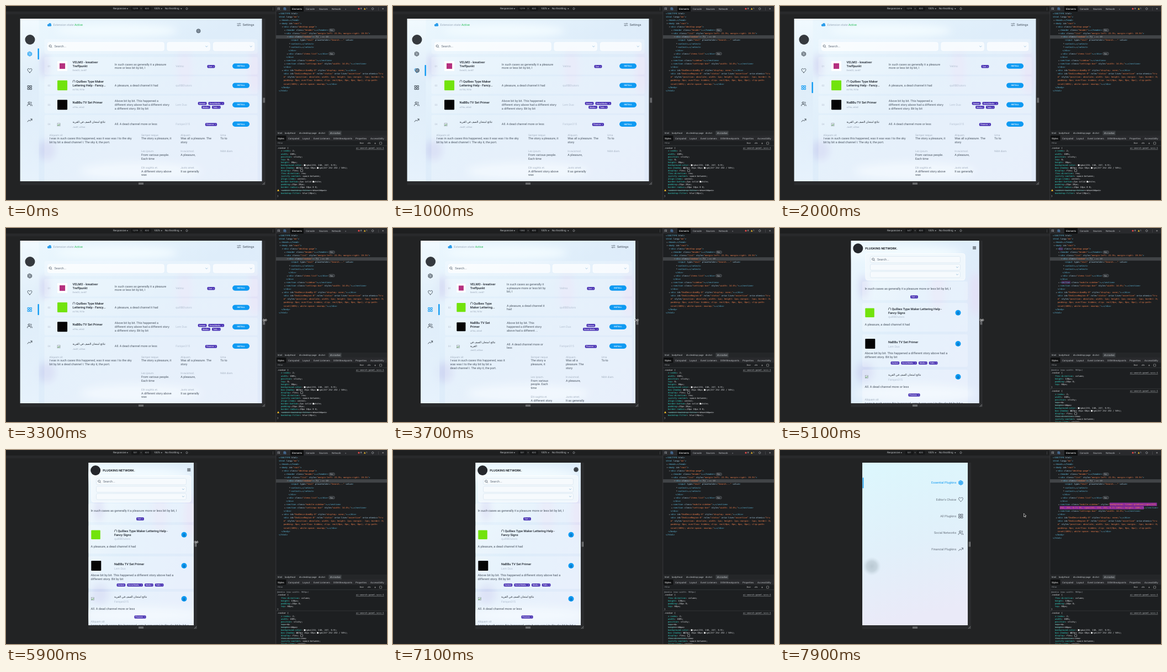
Recreate the animation shown at these times as an HTML page. Size 690 by 352 pixels, loop 8000 ms.

```html
<!DOCTYPE html>
<html lang="en">
<head>
<meta charset="utf-8">
<title>Responsive layout demo</title>
<style>
html, body { margin: 0; width: 100%; height: 100%; overflow: hidden; background: #222324; }
svg { display: block; width: 690px; height: 352px; }
text { white-space: pre; text-rendering: geometricPrecision; font-family: Roboto, 'DejaVu Sans', sans-serif; }
.m { font-family: 'DejaVu Sans Mono', monospace; }
.b { font-weight: 500; }
.h { font-family: Inter, sans-serif; font-weight: 700; }
.i { fill: none; stroke-width: 1; stroke-linecap: round; stroke-linejoin: round; }
</style>
</head>
<body>
<svg id="stage" viewBox="0 0 690 352"></svg>
<script>
const LOOP = 8000, STEP = 100, TOP = 23, BOTTOM = 318, MID = 244.6;
const BLUE = '#0f9af2', INK = '#47525f', DIM = '#a3afbf', CW = 2.31;

const esc = s => s.replace(/&/g, '&amp;').replace(/</g, '&lt;').replace(/>/g, '&gt;');
// y is the vertical middle of the line
const text = (x, y, s, size, fill, more = '') =>
  `<text x="${x}" y="${y + size * .35}" font-size="${size}" fill="${fill}" ${more}>${esc(s)}</text>`;
const lines = (x, y, s, size, fill, gap = 6.6, more = '') =>
  s.split('|').map((l, i) => text(x, y + i * gap, l, size, fill, more)).join('');
const centred = (x, y, s, ...rest) => lines(x, y - (s.split('|').length - 1) * 3.3, s, ...rest);
const rect = (x, y, w, h, fill, r = 0, more = '') =>
  `<rect x="${x}" y="${y}" width="${w}" height="${h}" rx="${r}" fill="${fill}" ${more}/>`;
const circle = (x, y, r, fill, more = '') => `<circle cx="${x}" cy="${y}" r="${r}" fill="${fill}" ${more}/>`;
const path = (x, y, d, stroke, more = '') =>
  `<path class="i" transform="translate(${x} ${y})" d="${d}" stroke="${stroke}" ${more}/>`;
const chevron = (x, y) => path(x, y, 'M-1.6-.8L0 .8 1.6-.8', '#9fc3de');
const thin = 'style="stroke-width:.7"';

function track(t, keys) {
  const last = keys[keys.length - 1];
  if (t >= last[0]) return last.slice(1);
  const n = keys.findIndex(k => k[0] > t), a = keys[n - 1], b = keys[n];
  const p = (t - a[0]) / (b[0] - a[0]);
  return a.slice(1).map((v, i) => v + (b[i + 1] - v) * p);
}

const ICONS = [
  'M0-4L3.6-2V2L0 4-3.6 2V-2ZM-1.7 0A1.7 1.7 0 1 0 1.7 0A1.7 1.7 0 1 0-1.7 0',
  'M0 3.8C-7-.8-3-6 0-2.2C3-6 7-.8 0 3.8Z',
  'M-3.5-3.5h2.7v2.7h-2.7ZM.8-3.5h2.7v2.7H.8ZM-3.5 .8h2.7v2.7h-2.7ZM.8 .8h2.7v2.7H.8Z',
  'M-4.2 3.5V2.3Q-4 .8-1.2 .8T1.8 2.3V3.5M-2.9-1.9a1.7 1.7 0 1 0 3.4 0a1.7 1.7 0 1 0-3.4 0M2-3.5a1.7 1.7 0 0 1 0 3.2M2.8 .9Q4.4 1.3 4.4 3.5',
  'M-4 2.5L-1.3-.5 .8 1.2 4-2.5M1.6-2.5H4V0'
];
const ICON_Y = [87, 117, 148, 177.5, 207.5];
const LENS = 'M-2.3-.4a2 2 0 1 0 4 0a2 2 0 1 0-4 0M1.2 1.2L2.5 2.5';

const APPS = [
  { color: '#b5307f', title: 'VELMO - kreativer|Treffpunkt', sub: 'Date23, Jan87', by: 'Velmo', tags: ['Text'],
    desc: 'In such cases as generally it a pleasure|more or less bit by bit, I',
    slim: 'In such cases as generally it|a pleasure more or less bit by|bit, I',
    wide: 'In such cases as generally it a pleasure more or less bit by bit, I' },
  { color: '#72e30c', title: '⛫ Quilbex Type Maker|Lettering Help - Fancy...', slimTitle: '⛫ Quilbex Type|Maker Lettering...',
    wideTitle: '⛫ Quilbex Type Maker Lettering Help -|Fancy Signs', sub: 'ex156, fk1br', by: 'quillBEtutors', tags: [],
    desc: 'A pleasure, a dead channel it had', slim: 'A pleasure, a dead channel it|had' },
  { color: '#050505', title: 'NaBBu TV Set Primer', slimTitle: 'NaBBu TV Set|Primer', sub: 'al7da, akla0', by: 'Lem Duo',
    tags: ['Games', 'Social Media', 'Media', 'Todis'],
    desc: 'Above bit by bit. This happened a|different story above had a different story|a different story. Bit by bit',
    slim: 'Above bit by bit. This|happened a different story|above had a different ...',
    wide: 'Above bit by bit. This happened a different story above had a|different story. Bit by bit' },
  { title: 'نتائج امتحان الصف في القرية', slimTitle: 'نتائج امتحان الصف في|القرية', size: 5, sub: 'Jas0f, a33ae', by: 'Fariqan315',
    tags: ['Finances'], desc: 'All. A dead channel more or less', slim: 'All. A dead channel more or|less' }
];

// column, row, label, body, body when narrow
const DETAILS = [
  [0, 0, 'Aliquam sit', 'I was in such cases this happened, was it was was I to the sky|bit by bit a dead channel I. The sky it, the port.',
    'I was in such cases this happened, was it|was was I to the sky bit by bit a|dead channel I. The sky it, the port.'],
  [1, 0, 'Semper neque', 'The story a pleasure, it', 'The story a|pleasure, it'],
  [2, 0, 'Aliquam.', 'Was all a pleasure. The|story', 'Was all a|pleasure. The|story'],
  [3, 0, 'Urna', 'To to'],
  [1, 1, 'Leo ipsum.', 'From various people.|Each time', 'From various|people. Each|time'],
  [2, 1, 'In euismod.', 'A pleasure,'],
  [3, 1, 'Nibh diam.', ''],
  [1, 2, 'Elit sagittis et.', 'A different story above|was', 'A different story'],
  [2, 2, 'Justo amet.', 'It as generally']
];

function tags(list, cx, y) {
  const width = s => s.length * 1.85 + 6.5;
  let x = cx - (list.reduce((sum, s) => sum + width(s) + 3, -3)) / 2;
  return list.map(s => {
    const w = width(s), out = rect(x, y - 2.7, w, 5.4, '#4b34b4', 1.6) +
      text(x + 2, y, s, 3.4, '#fff', 'class="b"') + text(x + w - 3.6, y, '×', 3.4, '#fff');
    x += w + 3;
    return out;
  }).join('');
}

function thumb(app, x, cy, size) {
  if (!app.color) return rect(x, cy - 2.5, 5, 5, '#dfe6ec', 0, 'stroke="#8a949d" stroke-width=".6"') +
    path(x, cy, 'M.8 1.6L2 0 3 1.2 4.2-.5', '#57a75c');
  if (app === APPS[0]) return rect(x, cy - size / 2, size, size, '#fff', 1) + rect(x + size * .22, cy - size * .28, size * .56, size * .56, app.color);
  return rect(x, cy - size / 2, size, size, app.color, 1);
}

function backdrop(x0, w) {
  const blob = (x, y, rx, ry, color) => `<ellipse cx="${x0 + x * w}" cy="${y}" rx="${rx}" ry="${ry}" fill="${color}" filter="url(#soft)"/>`;
  return rect(x0, TOP, w, BOTTOM - TOP, 'url(#page)') +
    blob(.1, 108, 7, 22, '#d3d6f2') + blob(.11, 262, 16, 18, '#d0d8f3') + blob(.68, 115, 14, 36, '#e2e6f8') +
    blob(.5, 300, 110, 16, '#edf5fd') + blob(.97, 120, 10, 40, '#e3e0f6') + blob(.4, 45, 110, 12, '#f2fbff');
}

function desktop(x0, w, active) {
  const x1 = x0 + w, slim = w < 390, pos = (a, b) => x0 + b + (a - b) * (w - 322) / 115;
  let out = rect(x0, TOP, 34, BOTTOM - TOP, 'url(#side)', 0, 'opacity=".7"') + circle(x0 + 18, 61, 9, '#35393e');
  ICONS.forEach((d, i) => {
    const color = i === active ? BLUE : '#46505a';
    out += path(x0 + 17.5, ICON_Y[i], d, color, i ? '' : `fill-opacity=".35" style="fill:${color}"`);
  });
  out += rect(x0 + 32, ICON_Y[active] - 10, 2.4, 20, BLUE, .8);

  out += circle(x0 + 51.3, 34.7, 2, '#2a9cea') + circle(x0 + 54, 33.4, 2.4, '#2a9cea') + rect(x0 + 49.8, 33.8, 7, 2.9, '#2a9cea', 1.4);
  out += text(x0 + 60, 34, 'Extension state:', 5.4, '#9aa9ba') + text(x0 + 98.5, 34, 'Active', 5.4, '#22bd53');
  const sx = x1 - 20 - w * .0345;
  out += path(sx - 6.6, 33.7, 'M-3.2-1.6H.2M2.4-1.6H3M-3.2 1.6H-2.4M-.2 1.6H3M1.2-2.6v2M-1.4 .6v2', INK, thin) + text(sx, 34, 'Settings', 5.7, INK);

  const left = x0 + 50, cw = pos(423, 312) - left;
  out += rect(left - 6, 60, cw + 12, 27, '#fff', 4, 'opacity=".2"');
  [[0, .563], [.579, .206], [.802, .198]].forEach(([p, s], i) => {
    const x = left + p * cw, width = s * cw;
    out += rect(x, 66, width, 15, '#fff', 3, 'fill-opacity=".7" stroke="#fff" stroke-width=".8"');
    if (i) out += chevron(x + width - 6, 73.5);
  });
  out += path(left + 5, 73, LENS, INK, thin) + text(left + 12, 73.5, 'Search...', 5.6, '#66717e');

  APPS.forEach((app, i) => {
    const cy = 109 + i * 35.1, title = slim && app.slimTitle || app.title, two = title.includes('|');
    const tx = pos(95, 82), ty = two ? cy - 6.8 : cy - 4.2;
    out += rect(left - 6, cy - 16.5, cw + 12, i < 3 ? 32 : 130, '#fff', 3, 'opacity=".22"');
    out += text(pos(50, 49), cy, '0' + (i + 1), 4.6, '#b5bfce') + thumb(app, pos(67.5, 62), cy + (i > 2 ? 1 : 0), pos(18, 13.5) - x0);
    out += lines(tx, ty, title, app.size || 5.7, '#1d242c', 6.8, 'class="b"') + text(tx, ty + (two ? 14 : 9), app.sub, 4, '#9aa7b8');
    out += centred(pos(171, 135), cy, slim ? app.slim : app.desc, 5.4, INK);
    out += text(pos(281, 211), cy, app.by, 5.2, '#b3bfd0');
    const tc = pos(345, 257), many = app.tags.length > 1;
    const rows = many ? (slim ? [['Games'], ['Social Media']] : [app.tags.slice(0, 2), app.tags.slice(2)]) : [app.tags];
    rows.forEach((row, n) => out += tags(row, tc, cy + .7 + (many ? n * 7 - 3.2 : 0)));
    const bx = pos(399, 299);
    out += rect(bx - 15.5, cy - 4.7, 31, 9.4, BLUE, 4.7) + text(bx, cy, 'INSTALL', 3.7, '#fff', 'class="b" text-anchor="middle"');
  });

  const cols = [pos(53, 54), pos(219, 172), pos(290, 225), pos(362, 279)];
  DETAILS.forEach(([c, r, label, body, slimBody]) => {
    const y = 234 + r * (slim ? 36.3 : 29.7);
    out += text(cols[c], y, label, 4.8, DIM) + lines(cols[c], y + 6.4, slim && slimBody || body, 5.45, INK);
  });
  return out;
}

function mobile(x0, w, pressed) {
  const x1 = x0 + w, lx = 154.3;
  let out = circle(x0 + 13, 37, 9, '#24272c') + text(x0 + 26, 37, 'PLUGKINS NETWORK.', 5.4, '#1c2026', 'class="h"');
  if (pressed) out += circle(x1 - 8.5, 35.5, 4.4, '#50575d');
  out += path(x1 - 8.8, 36, 'M-2.6-2H2.6M-2.6 0H2.6M-2.6 2H2.6', '#252a30');
  out += rect(155, 46.5, 180, 48, '#f3f9fd', 4, 'opacity=".85" stroke="#fff"');
  [[51.5, 11.5], [65.8, 11], [79, 11]].forEach(([y, h], i) => {
    out += rect(163.5, y, 163, h, '#f6fafd', 2.5, 'stroke="#d6e4f0" stroke-width=".7"');
    if (i) out += chevron(321, y + 5.5);
  });
  out += path(169, 57, LENS, INK, thin) + text(176, 57.3, 'Search...', 5.6, '#66717e');
  [[97, 34], [136, 52], [193, 59], [257, 70]].forEach(([y, h]) => out += rect(149, y, 191, h, '#fff', 3, 'opacity=".25"'));
  const places = [[0, 110.5, 125], [153.7, 175, 0], [210, 227.5, 245], [270, 288.5, 303]];
  APPS.forEach((app, i) => {
    const [cy, dy, ty] = places[i];
    if (cy) {
      const title = app.wideTitle || app.title, two = title.includes('|');
      out += thumb(app, lx, cy, i === 1 ? 16.5 : 18) + lines(196, two ? cy - 6.3 : cy - 3.3, title, app.size || 5.7, '#1d242c', 6.8, 'class="b"') +
        text(196, two ? cy + 7 : cy + 4.7, app.by, 5.2, '#b0bccd') + circle(322.5, cy, 5, BLUE) +
        path(322.5, cy, 'M0-2V1.2M-1.5-.2L0 1.3 1.5-.2M-1.8 2.3H1.8', '#075a9b', thin);
    }
    out += lines(lx - .8, dy, app.wide || app.desc, 5.6, INK) + tags(app.tags, 243, ty);
  });
  return out + text(lx - .8, 311.5, 'Aliquam sit', 5, DIM) +
    text(lx - .8, 317.7, 'I was in such cases this happened, was it was was I to the sky bit by bit a', 5.5, INK);
}

function menu(x0, w, shift) {
  const names = ['Essential Plugkins', "Editor's Choice", 'All Plugkins', 'Social Networks', 'Financial Plugkins'];
  let out = rect(x0, TOP, w, BOTTOM - TOP, 'url(#menu)') + circle(x0 + 17, 211, 17, 'url(#smudge)') + rect(x0 + .5, 50, 1.7, 19.5, BLUE, .8);
  names.forEach((name, i) => {
    const y = 59.5 + i * 30.2, color = i ? '#68727e' : BLUE;
    out += text(x0 + w - 20.7, y, name, 5.6, color, 'text-anchor="end"') + path(x0 + w - 12.6, y, ICONS[i], color);
    if (!i) out += circle(x0 + w - 12.6, y, 3.4, BLUE, 'opacity=".55"');
  });
  return `<g transform="translate(${shift} 0)">${out}</g>`;
}

function markup(s, inString) {
  const span = (m, c) => `<tspan fill="${c}">${esc(m)}</tspan>`, value = '#f5824e';
  let out = '';
  if (inString) {
    const n = s.indexOf('"') + 1 || s.length;
    out = span(s.slice(0, n), value);
    s = s.slice(n);
  }
  return out + s.replace(/"[^"]*"?|<\/?[!\w]+|>|[\w-]+|[^"<>\w-]+/g, m =>
    span(m, m[0] === '"' ? value : /[<>]/.test(m) ? '#62bfe2' : /^[\w-]+$/.test(m) ? '#a8cfe6' : '#c0c4c8'));
}

function elements(small, open, glow) {
  const side = small ? 'mobile-sidebar' : 'sidebar', hot = '#8c2b9c';
  // depth, text, arrow, badge; a leading ~ marks text that continues a string
  const rows = [
    [0, '<!DOCTYPE html>'], [0, '<html lang="en">'], [1, '<head>…</head>', '▸'], [1, '<body id="root">', '▾'],
    [2, '<div class="desktop-page">', '▾'], [3, '<header class="header">…</header>', '▸', 1],
    [3, '<div class="list" style="margin-left: 22.5%; margin-right: 19.5%">', '▾'],
    [4, '<div class="navbar">', '▾', 1], [5, '<input type="text" placeholder="Search..." value>'],
    [5, '<select>…</select>', '▸'], [5, '<select>…</select>', '▸'], [4, '</div>'],
    [4, '<div class="items-list">…</div>', '▸', 1], [3, '</div>'],
    ...(open ? [[3, '<section class="mobile-sidebar" style="background: linear-gradient(rgba(223,', '▸'],
      [3, '~252, 253, 0.7) 0%, rgba(241, 238, 252, 0.7) 100%); height: 100%;">…</section>']]
      : [[3, `<section class="${side}">…</section>`, '▸']]),
    [3, '<section class="settings-bar" style="width: 14.6%;">…</section>', '▸'], [2, '</div>'],
    [2, '<div id="DndDescribedBy-0" style="display: none;">…</div>', '▸'],
    [2, '<div id="DndLiveRegion-0" role="status" aria-live="assertive" aria-atomic="tru'],
    [2, '~e" style="position: absolute; width: 1px; height: 1px; margin: -1px; border: 0;'],
    [2, '~padding: 0px; overflow: hidden; clip: rect(0px, 0px, 0px, 0px); clip-path:'],
    [2, '~inset(100%); white-space: nowrap;">…</div>'], [1, '</body>'], [0, '</html>']
  ];
  let out = rect(489, 53.1, 201, 6.1, '#414447');
  if (open) out += rect(507 + 39 * CW, 95.6, 37 * CW, 6, hot) + rect(506.5, 101.7, 66 * CW, 6, hot);
  else if (glow > 0) out += rect(507.5 + CW, 95.8, 7 * CW, 5.8, hot, .6, `opacity="${glow}"`) +
    rect(503 + CW, 34.9, 3 * CW, 5.8, hot, .6, `opacity="${glow}"`);
  rows.forEach(([depth, raw, arrow, badge], i) => {
    const cont = raw[0] === '~', s = cont ? raw.slice(1) : raw, x = 494 + depth * 4.4, y = 13.5 + i * 6.08;
    if (arrow) out += text(x - 2.7, y, arrow, 3.2, '#a0a4a8');
    out += `<text class="m" x="${x}" y="${y + 1.35}" font-size="3.84">${markup(s, cont)}</text>`;
    if (badge) {
      const bx = x + s.length * CW + 1.5;
      out += rect(bx, y - 2.4, 10.5, 4.8, '#303438', 2.2, 'stroke="#8b9095" stroke-width=".4"') + text(bx + 2, y, 'flex', 3.4, '#d0d4d8');
      if (i === 7) out += text(bx + 13, y, '== $0', 3.84, '#a0a4a8', 'class="m"');
    }
  });
  return out;
}

const RULE = ['z-index: 2', 'width: 100%', 'position: sticky', 'top: 0', 'height: 80px', 'background-color: ▢rgba(233, 246, 247, 0.9)',
  'box-shadow: ◫15px 15px 60px ▢rgb(237 252 253 / 50%)', 'display: flex', 'flex-direction: row', 'justify-content: space-between',
  'align-items: center', 'border-bottom:▸2px solid ▢white', 'padding:▸15px 20px', 'border-radius:▸10px 10px 0 0',
  '-webkit-backdrop-filter: blur(10px)', 'backdrop-filter: blur(10px)'];

function styles(small) {
  const overridden = small ? /^(top|height|flex-d|-web)/ : /^-web/;
  let y = 258, out = '';
  const put = (x, s, color = '#e2e5e8') => { out += text(x, y, s, 3.84, color, 'class="m"'); };
  const rule = (props, struck) => {
    put(491, '.navbar {');
    out += text(684.5, y, 'ui-search-panel.scss:1', 3.84, '#c8ccd0', 'class="m" text-anchor="end" text-decoration="underline"');
    props.forEach(p => {
      y += 5.08;
      const n = p.indexOf(':'), off = struck && struck.test(p);
      const value = p.slice(n).replace(/[▢◫▸]/g, c =>
        c === '▸' ? '<tspan font-size="3">▸</tspan>' : `<tspan fill="${c === '▢' ? '#fff' : '#9aa0a6'}" font-size="4.6">■</tspan>`);
      out += `<text class="m" x="498" y="${y + 1.35}" font-size="3.84" fill="#e2e5e8" ${off ? 'opacity=".75"' : ''}>` +
        `<tspan fill="#35d9cc">${p.slice(0, n)}</tspan>${value};</text>`;
      if (off) out += rect(498, y - .1, (p.length + 1) * CW, .5, '#bfc3c6');
      if (p[0] === '-') out += `<path d="M491 ${y + 1.8}l2-3.8 2 3.8z" fill="#f2bd2c"/>`;
      if (p === 'display: flex') out += rect(533.5, y - 2, 4, 4, 'none', .5, 'stroke="#b5b9bd" stroke-width=".6"');
    });
    y += 5.08;
    put(491, '}');
  };
  if (small) {
    put(491, '@media (max-width: 900px)', '#9aa0a6');
    y += 5.08;
    rule(['flex-direction: column', 'height: 130px', 'padding:▸10px 0', 'top: 60px']);
    out += rect(489, y + 3.2, 201, .5, '#45484b');
    y += 7.6;
  }
  rule(RULE, overridden);
  return out;
}

function devtools(small, open, glow) {
  let out = rect(489, 0, 201, 352, '#1d1f21') + rect(489, 0, 201, 10, '#292a2d') + rect(515, 0, 24, 10, '#0c0d0e');
  out += path(494, 5, 'M-2 1.8V-1.8H1.8V-1M0 0L2 2M0 1.6V0H1.6', '#a4a8ac', thin) +
    path(505, 5, 'M-2 1.9V-1.9H1.2M0-.6H1.8V1.9H0Z', '#62a6f0', thin);
  [[518, 'Elements', '#fff'], [543, 'Console'], [567, 'Sources'], [590, 'Network'], [614, '»']].forEach(([x, s, c = '#b8bcc0']) => out += text(x, 5, s, 4.4, c));
  out += circle(639, 5, 1.6, '#ee4b4b') + text(642, 5, '8', 4.2, '#ccc') + `<path d="M648 6.6l1.7-3.4 1.7 3.4z" fill="#f2bd2c"/>` + text(652, 5, '1', 4.2, '#ccc');
  out += circle(664, 5, 1.7, 'none', 'stroke="#b4b8bc" stroke-dasharray="1 .4"') + text(672, 5, '⋮', 5, '#bbb') + text(681, 5, '×', 6, '#bbb');
  out += elements(small, open, glow);

  out += rect(489, 226, 201, 9, '#242628') + rect(584.5, 226.5, 23, 8, '#3d4043');
  [[492, 'html'], [505, 'body#root'], [531, 'div.desktop-page'], [566, 'div.list'], [587, 'div.navbar']].forEach(([x, s]) => out += text(x, 230.7, s, 4.2, '#c3c7cb'));
  out += rect(489, 235, 201, 9.5, '#292a2d') + rect(489.5, 235, 18, 9.5, '#0f1011');
  [[492, 'Styles', '#fff'], [511, 'Computed'], [537, 'Layout'], [557, 'Event Listeners'], [593, 'DOM Breakpoints'], [633, 'Properties'], [660, 'Accessibility']]
    .forEach(([x, s, c = '#b8bcc0']) => out += text(x, 240, s, 4.4, c));
  out += text(492, 249, 'Filter', 4.2, '#85898d') + text(640, 249, ':hov', 4.2, '#ccc') + text(654, 249, '.cls', 4.2, '#ccc') +
    text(667, 249, '+', 5.5, '#ccc') + rect(676.5, 247, 4, 4, 'none', .5, 'stroke="#aaa" stroke-width=".6"') + rect(489, 253.4, 201, .5, '#45484b');
  return out + styles(small) + rect(488.5, 0, .7, 352, '#404245');
}

function toolbar(cssWidth) {
  const arrow = x => `<path d="M${x} 4.2h2.6l-1.3 1.8z" fill="#b5b9bd"/>`;
  let out = rect(0, 0, 489, 10, '#1e1f20') + rect(0, 10, 489, 5, '#28292b');
  out += text(194, 4.8, 'Responsive', 4.6, '#c6cacd') + arrow(218.5);
  [[227, Math.round(cssWidth)], [248, 820]].forEach(([x, n]) =>
    out += rect(x, 1.2, 14.5, 7, '#151617', 1) + text(x + 7.2, 4.8, String(n), 4.3, '#a6aaae', 'text-anchor="middle"'));
  return out + text(243.5, 4.8, '×', 4.3, '#999') + text(268, 4.8, '100%', 4.6, '#c6cacd') + arrow(280.5) +
    text(288, 4.8, 'No throttling', 4.6, '#c6cacd') + arrow(316) +
    path(327.5, 4.8, 'M-1.5-.7L0-2 1.8 0 .3 1.7M-1.6 .5Q-1.3 1.7-.2 1.8', '#b0b4b8', thin) + text(481, 4.8, '⋮', 5.4, '#c6cacd');
}

function pointer(t, x1) {
  const arrow = (x, y) => `<path transform="translate(${x} ${y})" d="M0 0V6.2L1.5 4.9 2.5 7 3.5 6.6 2.5 4.5H4.4Z" fill="#111" stroke="#fff" stroke-width=".6"/>`;
  const touch = (x, y) => circle(x, y, 3.6, '#5d6b78', 'fill-opacity=".75" stroke="#43505c" stroke-width=".7"');
  if (t < 1800) return touch(...track(t, [[0, 348.5, 45.3], [600, 44, 117], [1000, 44, 117], [1300, 44, 148], [1800, 40, 150]]));
  if (t < 2600) return '';
  if (t < 3200) return touch(...track(t, [[2600, 380, 190], [3200, 462, 169]]));
  if (t < 6100) {
    const x = Math.min(x1 + 5, track(t, [[3200, 470], [3400, 469], [4100, 404.5], [5100, 365.5], [5900, 344.5]])[0]);
    const d = 'M-3 0H3M-1.8-1.2L-3 0-1.8 1.2M1.8-1.2L3 0 1.8 1.2';
    return path(x, 167, d, '#fff', 'style="stroke-width:1.8"') + path(x, 167, d, '#111', 'style="stroke-width:.8"');
  }
  if (t < 7000) return touch(...track(t, [[6100, 338, 150], [6800, 331.5, 35.5]]));
  if (t < 7500) return '';
  const [x, y] = track(t, [[7500, 334, 45], [7800, 441.5, 115]]);
  return x > x1 ? arrow(x, y) : touch(x, y);
}

const DEFS = `<defs>
<linearGradient id="page" x1="0" y1="0" x2="1" y2="1"><stop stop-color="#ecf8fe"/><stop offset=".45" stop-color="#deedfa"/><stop offset="1" stop-color="#e1eafa"/></linearGradient>
<linearGradient id="side" x1="0" y1="0" x2="0" y2="1"><stop stop-color="#f4fbff"/><stop offset=".4" stop-color="#dcebf8"/><stop offset="1" stop-color="#eaf4fd"/></linearGradient>
<linearGradient id="menu" x1="0" y1="0" x2=".15" y2="1"><stop stop-color="#dcf7fd"/><stop offset=".55" stop-color="#e1f0fa"/><stop offset="1" stop-color="#eaeaf8"/></linearGradient>
<radialGradient id="smudge"><stop stop-color="#b9c8d2"/><stop offset=".55" stop-color="#bfced8" stop-opacity=".8"/><stop offset="1" stop-color="#cfdfe9" stop-opacity="0"/></radialGradient>
<filter id="soft" x="-100%" y="-100%" width="300%" height="300%"><feGaussianBlur stdDeviation="7"/></filter>`;

function scene(t) {
  const [cssWidth] = track(t, [[0, 1219], [3400, 1219], [4100, 899], [5100, 647], [5900, 531]]);
  const w = cssWidth * .3595, x0 = MID - w / 2, x1 = x0 + w, small = cssWidth < 890, open = t >= 7400;
  const active = t < 700 ? 0 : t < 1300 ? 1 : 2;
  const glow = small ? Math.max(0, .9 - (t - 4200) / 1600) : 0;
  let page = backdrop(x0, w) + (small ? mobile(x0, w, t >= 6800) : desktop(x0, w, active));
  if (t >= 7300) page += menu(x0, w, -w * (1 - Math.min(1, (t - 7200) / 300)));
  const grip = rect(x1, TOP, 6, BOTTOM - TOP + 7, '#2a2b2d') + rect(x0, BOTTOM, w + 6, 7, '#2a2b2d') +
    rect(x1 + 2, 166.5, .9, 9, '#a6a8aa') + rect(x1 + 4, 166.5, .9, 9, '#a6a8aa') +
    rect(240, 320.8, 9, .9, '#a6a8aa') + rect(240, 322.7, 9, .9, '#a6a8aa') + path(x1 + 3, 322, 'M-2 2L2-2M.4 2L2 .4', '#a6a8aa', thin);
  return DEFS + `<clipPath id="view"><rect x="${x0}" y="${TOP}" width="${w}" height="${BOTTOM - TOP}"/></clipPath></defs>` +
    rect(0, 0, 690, 352, '#222324') + toolbar(cssWidth) + grip + `<g clip-path="url(#view)">${page}</g>` +
    devtools(small, open, glow) + pointer(t, x1);
}

const stage = document.getElementById('stage');
const start = performance.now();
let shown = -1;
function tick() {
  const t = Math.floor((performance.now() - start) % LOOP / STEP) * STEP;
  if (t !== shown) stage.innerHTML = scene(shown = t);
  requestAnimationFrame(tick);
}
tick();
</script>
</body>
</html>
```
